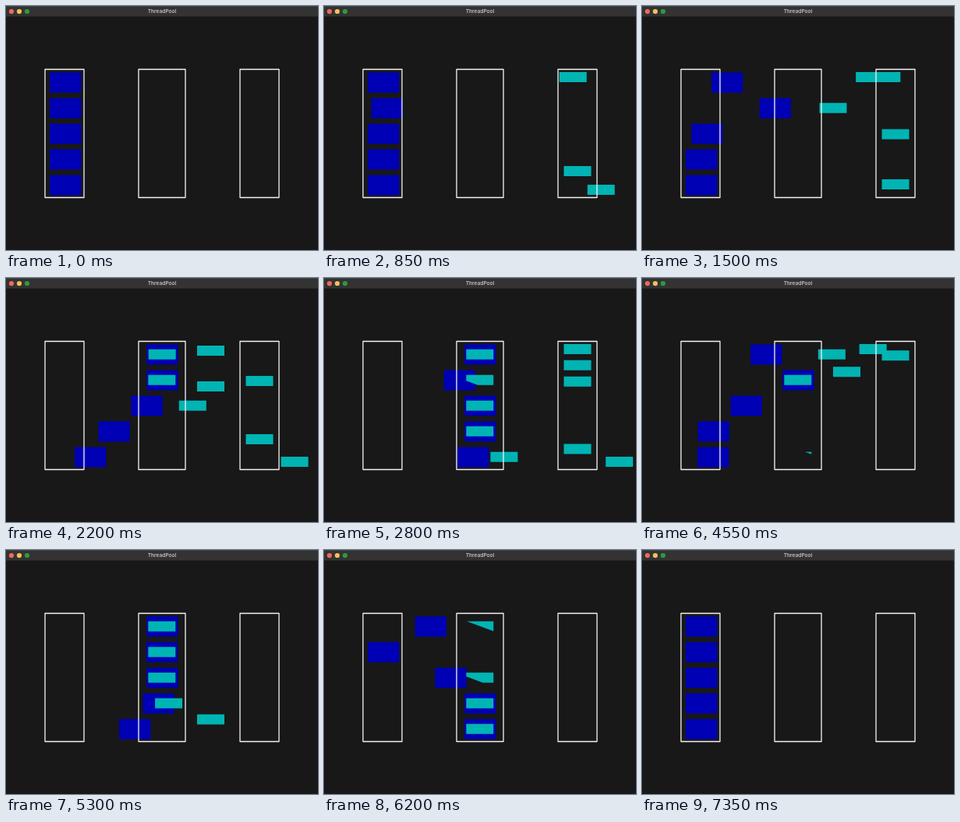
These frames come from a looping animation (400x314 px, 7450 ms). An HTML page:

```html
<!DOCTYPE html>
<html lang="en">
<head>
<meta charset="utf-8">
<title>ThreadPool</title>
<style>
  html, body { margin: 0; width: 100%; height: 100%; overflow: hidden; background: #181818; }
  svg { display: block; width: 400px; height: 314px; }
  text { font: 600 6.6px Inter, "Liberation Sans", sans-serif; fill: #c4c4c4; text-anchor: middle; }
</style>
</head>
<body>
<svg viewBox="0 0 400 314">
  <rect width="400" height="314" fill="#181818"/>
  <rect width="400" height="13.5" fill="#333"/>
  <rect width="400" height="0.7" fill="#4a4a4a"/>
  <circle cx="7" cy="7" r="3.1" fill="#ec6a5e"/>
  <circle cx="17" cy="7" r="3.1" fill="#f4bf62"/>
  <circle cx="27" cy="7" r="3.1" fill="#2f9a3c"/>
  <text x="200" y="9.2">ThreadPool</text>
  <g id="threads" fill="#0000b4"/>
  <g id="tasks" fill="#00b4b4"/>
  <g fill="none" stroke="#f4f4f4" stroke-width="1.3" stroke-linejoin="round">
    <rect x="50" y="81.5" width="50" height="165"/>
    <rect x="170" y="81.5" width="60" height="165"/>
    <rect x="300" y="81.5" width="50" height="165"/>
  </g>
</svg>
<script>
const LOOP = 7450, FRAME = 50;
const MOVE = 896;            // one trip, and also the time a job runs
const ROUND = 3 * MOVE;      // out, work, back
const SHIFT = 185;           // the queue moves up one slot
const W = 35, H = 13;        // task size
const QUEUE_X = 307.5, QUEUE_Y = 85, SLOT = 20.7;
const LANE_X = 245, WORK_X = 182.3;
const POOL_X = 56, DESK_X = 180.2;
const ENTRY = [425.5, 230];
const HOLDS = [50, 800, 3850, 6150, 7400];

// In order of dispatch: row of the thread and the time it first leaves
const crew = [[1, 817], [0, 1262], [2, 1447], [3, 1750], [4, 1970]]
  .map(([row, start]) => ({ row, start }));
const lateEntries = [1444, 1656, 1905, 2200, 2480];

const clamp = v => Math.min(1, Math.max(0, v));
const lerp = (a, b, p) => a + (b - a) * p;

function add(parent, tag, attrs) {
  const el = document.createElementNS("http://www.w3.org/2000/svg", tag);
  for (const key in attrs) el.setAttribute(key, attrs[key]);
  return document.getElementById(parent).appendChild(el);
}

// Point at share p of a polyline's length
function along(points, p) {
  const lengths = points.slice(1).map((q, i) =>
    Math.hypot(q[0] - points[i][0], q[1] - points[i][1]));
  let left = clamp(p) * lengths.reduce((a, b) => a + b, 0);
  for (let i = 0; i < lengths.length; i++) {
    const last = i === lengths.length - 1;
    if (left <= lengths[i] || last) {
      const k = lengths[i] ? clamp(left / lengths[i]) : 1;
      return [lerp(points[i][0], points[i + 1][0], k), lerp(points[i][1], points[i + 1][1], k)];
    }
    left -= lengths[i];
  }
}

// What a diagonal wipe from bottom left to top right leaves of a task
function remainder(x, y, p) {
  if (p >= 1) return "";
  const d = 2 * p;
  const shape = p < 0.5
    ? [[0, 0], [W, 0], [W, H], [d * W, H], [0, (1 - d) * H]]
    : [[(d - 1) * W, 0], [W, 0], [W, (2 - d) * H]];
  return shape.map(([a, b]) => `${(x + a).toFixed(2)},${(y + b).toFixed(2)}`).join(" ");
}

for (const c of crew) {
  c.el = add("threads", "rect", { y: 85.5 + 33 * c.row, width: 40.3, height: 26 });
}

const tasks = [];
for (let round = 0; round < 2; round++) {
  crew.forEach((c, i) => {
    const start = c.start + round * ROUND;
    tasks.push({
      row: c.row,
      start,
      slot: round ? i : 0,
      enter: round ? lateEntries[i] : start - MOVE,
      trip: round ? MOVE : MOVE * 1.05,
      el: add("tasks", "polygon", {})
    });
  });
}

function threadX(c, t) {
  const age = t - c.start;
  if (age < 0 || age >= 2 * ROUND) return POOL_X;
  const u = age % ROUND / MOVE;
  return lerp(POOL_X, DESK_X, u < 2 ? clamp(u) : 3 - u);
}

function taskPlace(k, t) {
  const queueY = QUEUE_Y + SLOT * k.slot;
  if (t >= k.start) {
    const y = 91.7 + 33 * k.row;
    const path = [[QUEUE_X, QUEUE_Y], [LANE_X, QUEUE_Y], [LANE_X, y], [WORK_X, y]];
    return along(path, (t - k.start) / k.trip);
  }
  if (t < k.enter + MOVE) {
    return along([ENTRY, [QUEUE_X, ENTRY[1]], [QUEUE_X, queueY]], (t - k.enter) / MOVE);
  }
  let moved = 0;
  for (let i = 0; i < k.slot; i++) {
    moved += clamp((t - crew[i].start - ROUND) / SHIFT);
  }
  return [QUEUE_X, queueY - SLOT * moved];
}

function draw(t) {
  for (const c of crew) c.el.setAttribute("x", threadX(c, t).toFixed(2));
  for (const k of tasks) {
    const [x, y] = taskPlace(k, t);
    const wiped = clamp((t - k.start - 2 * MOVE) / MOVE);
    k.el.setAttribute("points", remainder(x, y, wiped));
  }
}

const begin = performance.now();
function tick() {
  const elapsed = (performance.now() - begin) % LOOP;
  let t = Math.floor(elapsed / FRAME) * FRAME;
  if (HOLDS.includes(t)) t -= FRAME;
  draw(t);
  requestAnimationFrame(tick);
}
tick();
</script>
</body>
</html>
```
